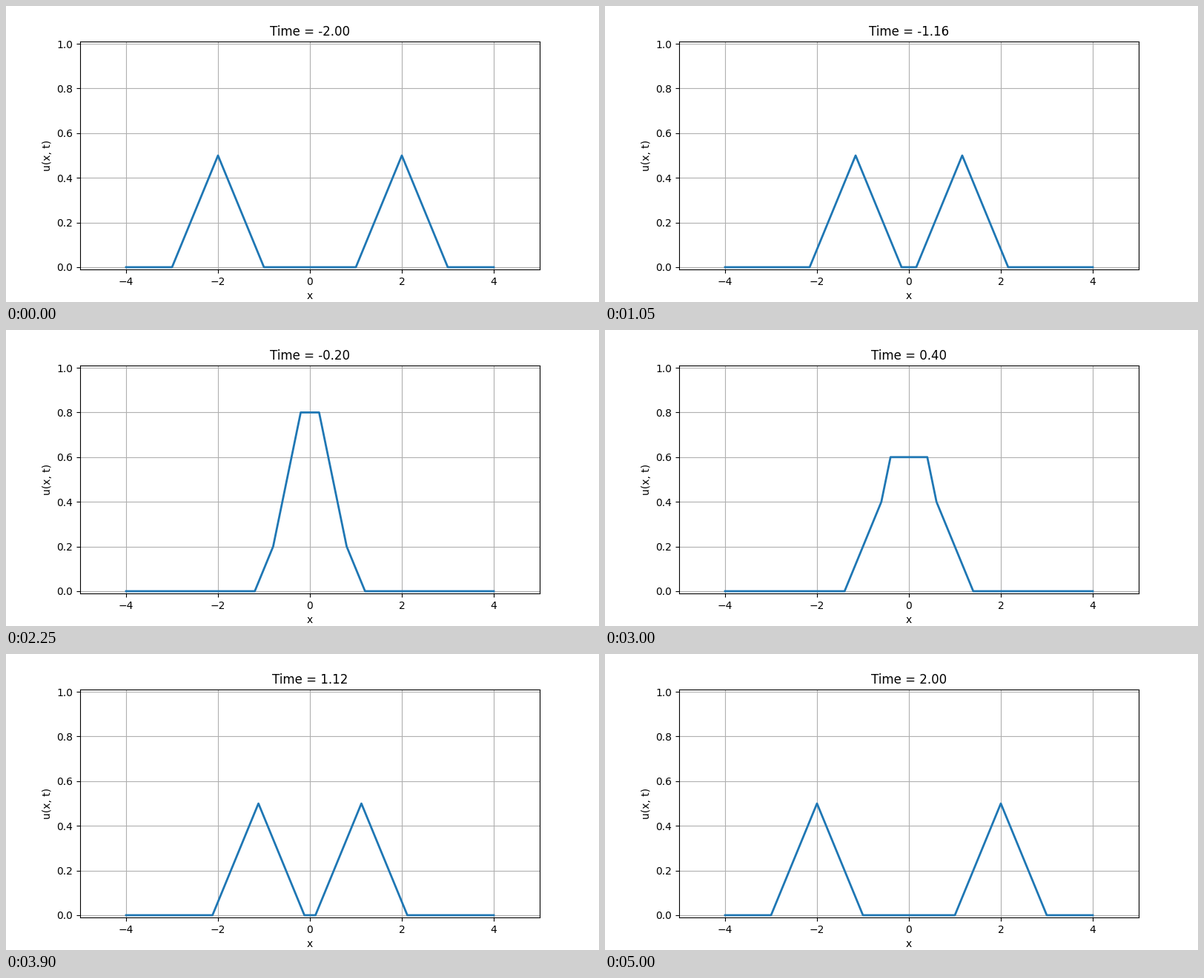
A matplotlib script for the animation above (5.05 s loop, 800 by 400 pixels).

```python
import numpy as np
import matplotlib.pyplot as plt
from matplotlib.animation import FuncAnimation

FRAMES = 101
INTERVAL = 50  # ms

x = np.linspace(-4, 4, 801)
times = np.linspace(-2, 2, FRAMES)


def hat(s):
    """Unit triangle centred on zero."""
    return np.maximum(0, 1 - np.abs(s))


def wave(t):
    """d'Alembert solution: two half-height hats moving apart."""
    return 0.5 * (hat(x - t) + hat(x + t))


fig, ax = plt.subplots(figsize=(8, 4), dpi=100)
line, = ax.plot(x, wave(times[0]), lw=2)
ax.set_xlim(-5, 5)
ax.set_ylim(-0.01, 1.01)
ax.set_xlabel("x")
ax.set_ylabel("u(x, t)")
ax.grid(True)
title = ax.set_title("")


def update(i):
    t = times[i]
    line.set_ydata(wave(t))
    title.set_text(f"Time = {t:.2f}")
    return line, title


anim = FuncAnimation(fig, update, frames=FRAMES, interval=INTERVAL,
                     init_func=lambda: update(0), repeat=True,
                     repeat_delay=0, blit=False)
plt.show()
```
